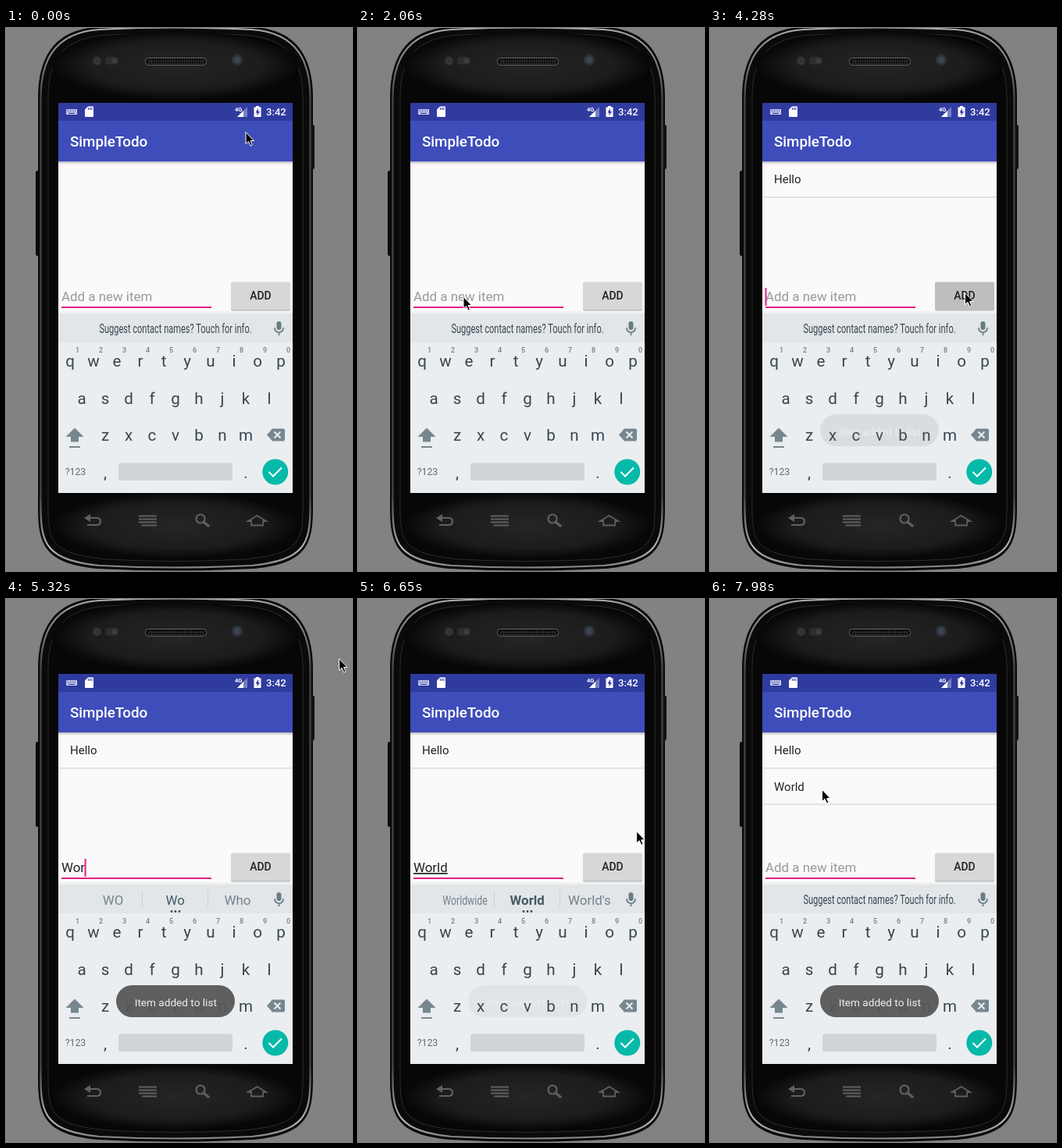
Recreate the animation shown at these times as an HTML page. Size 443 px wide and 696 px high, loop 8 s.

```html
<!DOCTYPE html>
<html lang="en">
<head>
<meta charset="utf-8">
<title>Todo demo</title>
<style>
  html, body { margin: 0; width: 100%; height: 100%; overflow: hidden; background: #828282; }
  svg { display: block; width: 443px; height: 696px; font-family: Roboto, sans-serif; }
  text { white-space: pre; }
  .mid { text-anchor: middle; }
  .key { font-size: 20.6px; fill: #37474f; }
  .digit { font-size: 9px; font-weight: 500; fill: #6f7d84; }
  .word { font-size: 16.9px; fill: #74838a; }
  .field { font-size: 16.9px; }
  .item { font-size: 15px; fill: #212121; }
</style>
</head>
<body>
<svg viewBox="0 0 443 696" xmlns="http://www.w3.org/2000/svg">
  <defs>
    <linearGradient id="rim" x1="0" y1="0" x2="0" y2="696" gradientUnits="userSpaceOnUse">
      <stop offset="0" stop-color="#a9acab"/><stop offset=".13" stop-color="#454746"/>
      <stop offset=".86" stop-color="#454746"/><stop offset=".96" stop-color="#b4b6b5"/>
      <stop offset="1" stop-color="#7b7d7c"/>
    </linearGradient>
    <radialGradient id="gloss">
      <stop offset="0" stop-color="#252525"/><stop offset=".7" stop-color="#1c1c1c"/>
      <stop offset="1" stop-color="#070707"/>
    </radialGradient>
    <linearGradient id="shade" x1="0" y1="0" x2="0" y2="1">
      <stop offset="0" stop-opacity=".26"/><stop offset="1" stop-opacity="0"/>
    </linearGradient>
    <pattern id="mesh" width="3" height="3" patternUnits="userSpaceOnUse">
      <path d="M0 0H3M0 0V3" stroke="#4b4b4b"/>
    </pattern>
  </defs>

  <rect width="443" height="696" fill="#828282"/>
  <g id="body"></g>
  <ellipse cx="217" cy="48" rx="158" ry="44" fill="url(#gloss)"/>
  <ellipse cx="217" cy="638" rx="158" ry="42" fill="url(#gloss)"/>
  <rect x="38" y="183" width="5" height="109" rx="2" fill="#0b0b0b"/>
  <rect x="391" y="124" width="4" height="57" rx="2" fill="#111"/>

  <!-- earpiece, sensors, camera -->
  <circle cx="116.500" cy="42" r="5.500" fill="#323333"/>
  <rect x="127" y="37" width="17" height="10" rx="4.500" fill="#2b2d2e"/>
  <circle cx="139" cy="42" r="3.500" fill="#3a3d40"/>
  <rect x="178.500" y="38.500" width="78" height="9" rx="4" fill="#080808" stroke="#686868"/>
  <rect x="181" y="40" width="73" height="6" fill="url(#mesh)"/>
  <circle cx="296" cy="41" r="7.500" fill="#2c2f33"/>
  <circle cx="296" cy="41" r="4.500" fill="#3c4350"/>

  <!-- hardware buttons -->
  <g fill="none" stroke="#606060" stroke-width="2.200">
    <path d="M104 628H116Q121 628 121 632.500T116 637H104"/>
    <path d="M108 623L100 628L108 633Z" fill="#606060" stroke="none"/>
    <path d="M170 625.500H193M170 629.500H193M170 633.500H193M174 637.500H193" stroke-width="1.800"/>
    <circle cx="249" cy="629" r="5.500"/>
    <path d="M253 633L260 639" stroke-width="3.200"/>
    <path d="M310 632L321.500 625L333 632H329V637.500H314V632Z" stroke-width="1.800"/>
  </g>

  <!-- app -->
  <rect x="67" y="96" width="300" height="500" fill="#fafafa"/>
  <rect x="67" y="96" width="300" height="23" fill="#303b9f"/>
  <rect x="67" y="119" width="300" height="52" fill="#3f4dba"/>
  <rect x="67" y="171" width="300" height="4" fill="url(#shade)"/>
  <text x="82" y="151.500" font-size="18.75" font-weight="500" fill="#fff">SimpleTodo</text>

  <g fill="#fff">
    <rect x="77" y="104" width="14" height="7" rx="1" fill="#c9cdec"/>
    <path d="M78 105.500H90M78 107.500H90" stroke="#303b9f" stroke-dasharray="1 1"/>
    <path d="M80 109.500H88" stroke="#303b9f"/>
    <path d="M105 100.500H111Q112 100.500 112 101.500V113Q112 114 111 114H102Q101 114 101 113V104.500Z"/>
    <path d="M105.500 102V105M107.800 102V105M110 102V105" stroke="#303b9f" stroke-width="1.100"/>
    <path d="M309 101V114H296Z" opacity=".35"/>
    <path d="M304 106V114H296Z"/>
    <text x="293" y="107" font-size="7.500" font-weight="700">4G</text>
    <path d="M320 100H324V101.500H326.500V114H317.500V101.500H320Z"/>
    <path d="M323 103L319.500 108.500H321.500V112.500L325 107H323Z" fill="#303b9f"/>
    <text x="333" y="112.200" font-size="13.100" font-weight="500">3:42</text>
  </g>

  <g id="list"></g>

  <rect x="71" y="357" width="192" height="2" fill="#e61e87"/>
  <text id="hint" class="field" x="71" y="350" fill="#999">Add a new item</text>
  <text id="entry" class="field" x="71" y="350" fill="#212121"></text>
  <rect id="caret" y="333" width="2" height="23" fill="#e61e87"/>

  <rect x="288" y="327" width="76" height="35.500" rx="2" fill="#bbb"/>
  <rect id="button" x="288" y="325.500" width="76" height="35.500" rx="2"/>
  <text class="mid" x="326" y="348.300" font-size="13.900" font-weight="500" fill="#202020">ADD</text>

  <!-- keyboard -->
  <rect x="67" y="363" width="300" height="3" fill="#f0f1f2"/>
  <rect x="67" y="366" width="300" height="230" fill="#eaeef1"/>
  <rect x="67" y="366" width="300" height="37" fill="#e2e6e9"/>
  <g id="tip" transform="translate(217 391) scale(.69 1)">
    <text class="mid" font-size="16" fill="#37474f">Suggest contact names? Touch for info.</text>
  </g>
  <g id="words">
    <path d="M174.500 374V396M258.500 374V396" stroke="#cbd1d5"/>
    <path d="M212 400.500H223" stroke="#37474f" stroke-width="2.800" stroke-linecap="round" stroke-dasharray="0 5"/>
    <g id="slots"></g>
  </g>
  <g fill="#6b7b83">
    <rect x="346.500" y="376" width="6" height="11" rx="3"/>
    <path d="M344 384Q344 390 349.500 390T355 384M349.500 390V394" fill="none" stroke="#6b7b83" stroke-width="1.700"/>
  </g>
  <g id="keys"></g>
  <g fill="#78878f">
    <path d="M88 512.500L99.500 524H93V530.500H83V524H76.500Z"/>
    <rect x="81" y="536" width="14" height="2"/>
    <path d="M341 513.500H355Q357 513.500 357 515.500V527.500Q357 529.500 355 529.500H341L334 521.500Z"/>
    <path d="M343.500 517.500L351.500 525.500M351.500 517.500L343.500 525.500" stroke="#eaeef1" stroke-width="2"/>
    <text class="mid" x="89" y="573" font-size="12.300" fill="#5c6c74">?123</text>
  </g>
  <rect x="144" y="557.500" width="146" height="22.500" rx="3" fill="#cfd4d8"/>
  <circle cx="344.800" cy="569" r="16.500" fill="#04b9a8"/>
  <path d="M336.500 569L342 574.500L353 563.500" fill="none" stroke="#fff" stroke-width="2"/>

  <g id="toast">
    <rect x="141" y="495" width="152" height="41" rx="20.500" fill="#575757" opacity=".94"/>
    <text class="mid" x="217.300" y="521.500" font-size="13.600" fill="#f0f0f0">Item added to list</text>
  </g>
  <path id="pointer" d="M0 0V15L3.500 11.800L6 17.500L8.400 16.400L6 11H10.500Z" stroke="#fff" stroke-width="1" stroke-linejoin="round"/>
</svg>
<script>
const LOOP = 8000, TICK = 147.6, LEAD = 15, BLINK = 500;
const $ = id => document.getElementById(id);
const clamp = v => Math.min(1, Math.max(0, v));
const easeOut = v => v * (2 - v);
const label = (s, x, y, cls) => `<text class="${cls}" x="${x}" y="${y}">${s}</text>`;

function outline(left, top, bottom) {
  const right = 434 - left;
  return `M${left} 90C${left} 45 ${left + 15} ${top + 4} ${left + 75} ${top}
    Q217 ${top - 5} ${right - 75} ${top}C${right - 15} ${top + 4} ${right} 45 ${right} 90V615
    C${right} 662 ${right - 8} ${bottom - 7} ${right - 75} ${bottom}Q217 ${bottom + 5} ${left + 75} ${bottom}
    C${left + 8} ${bottom - 7} ${left} 662 ${left} 615Z`;
}
$('body').innerHTML = `
  <path d="${outline(41, -1, 693)}" fill="#0a0a0a"/>
  <path d="${outline(44.5, 2, 689)}" fill="none" stroke="url(#rim)" stroke-width="2.200"/>
  <path d="${outline(54, 9, 681)}" fill="#070707" stroke="#2c2c2c"/>`;

const row = (chars, x, y, cls = 'mid key') =>
  [...chars].map((c, i) => label(c, x + 30 * i, y, cls)).join('');
$('keys').innerHTML = row('1234567890', 91.5, 416, 'mid digit') +
  row('qwertyuiop', 82, 434) + row('asdfghjkl', 97, 481.5) + row('zxcvbnm', 127, 529) +
  row(',', 127, 576.5) + row('.', 307, 576.5);

// Times below count screen refreshes of TICK ms.
const edits = [
  { word: 'Hello', start: 16, pace: 1, add: 29, near: 'Help', offers: ['Help', 'Hello', 'Cello'] },
  { word: 'World', start: 33, pace: 1.4, add: 48, near: 'Who', offers: ['Worldwide', 'World', "World's"] }
];
const moves = [
  { from: 0, to: 5, x: 241, y: 538 },
  { from: 8, to: 12, x: 135, y: 344.5 },
  { from: 23, to: 27, x: 326.5, y: 339.5, bendX: 24, bendY: -28 },
  { from: 31, to: 35, x: 426.5, y: 76.5 },
  { from: 42, to: 47, x: 321, y: 340, bendX: 35 },
  { from: 50, to: 54, x: 143.5, y: 244.5 }
];

$('list').innerHTML = edits.map(({ word }, i) => {
  const y = 199.3 + 46.3 * i;
  return `<g>${label(word, 82, y, 'item')}<path d="M67 ${y + 17.5}H367" stroke="#d6d6d6" stroke-width="1.200"/></g>`;
}).join('');

const show = (el, on) => el.setAttribute('visibility', on ? 'visible' : 'hidden');

function pointerAt(n) {
  let x = 307, y = 133.5;
  for (const m of moves) {
    const p = easeOut(clamp((n - m.from) / (m.to - m.from)));
    const bulge = 4 * p * (1 - p);
    x += (m.x - x) * p + (m.bendX || 0) * bulge;
    y += (m.y - y) * p + (m.bendY || 0) * bulge;
  }
  return [x, y];
}

// Suggestions trail the typing by one letter until the word is complete.
function entryAt(n) {
  const edit = edits.findLast(e => e.start <= n);
  if (!edit) return { typed: '', offers: [], reset: -BLINK / TICK };
  if (n >= edit.add) return { typed: '', offers: [], reset: edit.add };
  const { word, start, pace, near } = edit;
  const end = start + pace * word.length, done = n >= end;
  const typed = word.slice(0, Math.floor((n - start) / pace) + 1);
  const prefix = typed.slice(0, -1);
  const offers = done ? edit.offers : prefix ? [prefix.toUpperCase(), prefix, near] : [];
  return { typed, offers, done, reset: Math.min(n, end) };
}

function toastAt(n) {
  const alpha = ({ add }) => n < add ? 0 : Math.min(clamp((n - add + .4) / 3.5), clamp((add + 16.2 - n) / 3));
  return Math.max(...edits.map(alpha));
}

function slot(s, i, done) {
  const style = i === 1 ? `fill:#455a64;font-weight:${done ? 700 : 400}` : '';
  const squeeze = s.length > 8 ? .73 : 1;
  return `<g transform="translate(${137 + 79.7 * i} 391.500) scale(${squeeze} 1)">
    <text class="mid word" style="${style}">${s}</text></g>`;
}

function draw(n) {
  const { typed, offers, done, reset } = entryAt(n);
  $('entry').textContent = typed;
  $('entry').setAttribute('text-decoration', done ? 'underline' : 'none');
  $('slots').innerHTML = offers.map((s, i) => slot(s, i, done)).join('');
  show($('hint'), !typed);
  show($('tip'), !offers.length);
  show($('words'), offers.length);
  show($('caret'), Math.floor((n - reset) * TICK / BLINK) % 2 === 0);
  $('caret').setAttribute('x', 70.5 + (typed && $('entry').getComputedTextLength()));
  const pressed = edits.some(({ add }) => n >= add - 1 && n < add + 1);
  $('button').setAttribute('fill', pressed ? '#bebebe' : '#d6d7d7');
  $('toast').setAttribute('opacity', toastAt(n));
  [...$('list').children].forEach((el, i) => show(el, n >= edits[i].add));
  $('pointer').setAttribute('transform', `translate(${pointerAt(n)})`);
}

const start = performance.now();
let drawn = -1;
function tick() {
  const t = (performance.now() - start) % LOOP;
  const n = Math.floor((t + LEAD) / TICK);
  if (n !== drawn) draw(drawn = n);
  requestAnimationFrame(tick);
}
tick();
</script>
</body>
</html>
```
